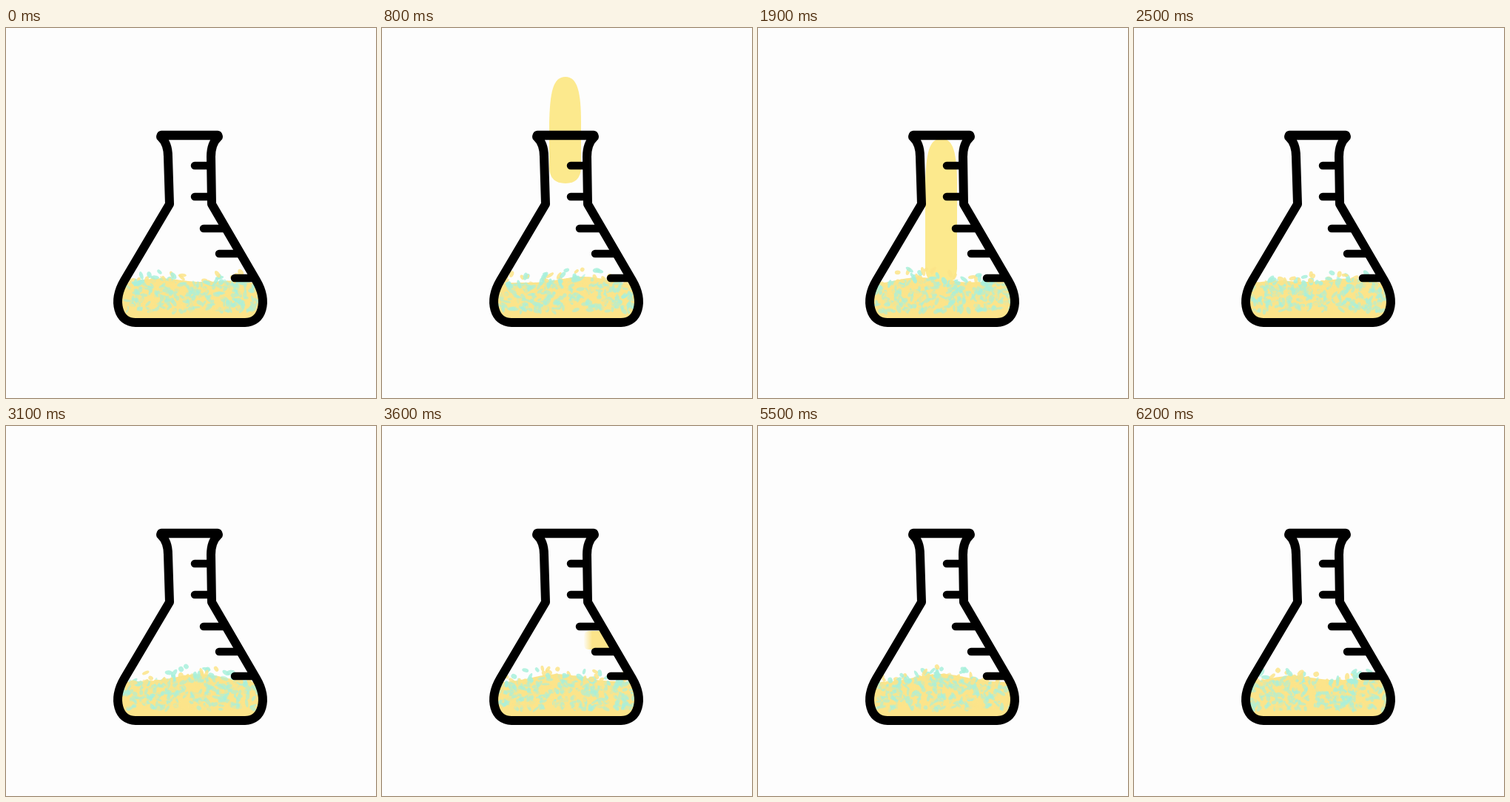
Write an HTML page with a canvas that moves like this. It is 500x500 px and loops after 6.3 s.

```html
<!DOCTYPE html>
<html lang="en">
<head>
<meta charset="utf-8">
<title>Flask</title>
<style>
html, body { margin: 0; width: 100%; height: 100%; overflow: hidden; background: #fdfdfd; }
canvas { display: block; width: 500px; height: 500px; }
</style>
</head>
<body>
<canvas id="stage" width="500" height="500"></canvas>
<script>
const ctx = document.getElementById('stage').getContext('2d');
const LOOP = 6300, STEP = 100;
const YELLOW = '#fce48a', STREAM = '#fce98d', BLUE = '#a8f0dc';
const LEFT = 150, RIGHT = 348, FLOOR = 405;

const flask = new Path2D('M209 147Q219 156 219 174L221 238L160 341C143 370 152 398 175 398H323C346 398 355 370 338 341L278 238L277 174Q277 156 287 147');
const lip = new Path2D('M210 145H286');
const ticks = new Path2D('M255 186H277M255 228H277M267 271H296M288 305H316M309 338H336');

function random(seed) {
  let s = (seed + 1) * 7919;
  return () => {
    s = (s * 1664525 + 1013904223) >>> 0;
    return s / 4294967296;
  };
}

// A slow swell that is flat at both walls.
function surface(x, t) {
  const swell = Math.sin(Math.PI * (x - LEFT) / (RIGHT - LEFT));
  const phase = Math.PI * 2 * t / LOOP;
  return 345 - swell * (8 + 4 * Math.sin(x / 24 + phase * 3));
}

function dab(x, y, rx, ry, angle, color) {
  ctx.fillStyle = color;
  ctx.beginPath();
  ctx.ellipse(x, y, rx, ry, angle, 0, Math.PI * 2);
  ctx.fill();
}

const fall = (t, start, speed) => 66 + speed * Math.max(0, (t - start) / 100) ** 2;

function drawStream(t) {
  const top = fall(t, 1270, 2.1);
  const end = Math.min(346, fall(t, 500, 16));
  const h = end - top;
  if (h < 4) return;
  const bend = Math.min(62, h / 2);
  ctx.fillStyle = STREAM;
  ctx.beginPath();
  ctx.moveTo(226, top + bend);
  ctx.bezierCurveTo(227, top + bend / 3, 231, top, 248, top);
  ctx.bezierCurveTo(264, top, 269, top + bend / 3, 269, top + bend);
  ctx.lineTo(269, end - bend / 3);
  ctx.quadraticCurveTo(268, end, 248, end);
  ctx.quadraticCurveTo(227, end, 226, end - bend / 3);
  ctx.fill();
}

function drawSplash(t) {
  const k = (t - 3600) / 100;
  if (Math.abs(k) > 3) return;
  const fade = ctx.createLinearGradient(272, 0, 284, 0);
  fade.addColorStop(0, '#fce48a00');
  fade.addColorStop(1, YELLOW);
  ctx.fillStyle = fade;
  ctx.beginPath();
  ctx.roundRect(273, 277 + 8 * k * k, 38, 25, 6);
  ctx.fill();
}

function drawLiquid(t) {
  const rnd = random(t / STEP);
  const spread = (min, max) => min + rnd() * (max - min);

  ctx.fillStyle = YELLOW;
  ctx.beginPath();
  ctx.moveTo(LEFT, FLOOR);
  for (let x = LEFT; x <= RIGHT; x += 3) ctx.lineTo(x, surface(x, t) + 2);
  ctx.lineTo(RIGHT, FLOOR);
  ctx.fill();

  ctx.globalAlpha = 0.6;
  for (let i = 0; i < 320; i++) {
    const x = spread(158, 342), y = spread(surface(x, t) + 3, 383);
    dab(x, y, spread(3, 6), spread(1.5, 3), spread(0, Math.PI), i % 5 < 3 ? BLUE : YELLOW);
  }
  // Loose dabs along the surface.
  ctx.globalAlpha = 0.85;
  for (let i = 0; i < 40; i++) {
    const x = spread(166, 332), y = surface(x, t) + 5 - 15 * rnd() ** 2;
    dab(x, y, spread(3, 6.5), spread(2, 3.5), spread(0, Math.PI), i % 2 ? YELLOW : BLUE);
  }
  ctx.globalAlpha = 1;
}

function stroke(path, width) {
  ctx.lineWidth = width;
  ctx.stroke(path);
}

function draw(now) {
  const t = Math.floor((now % LOOP) / STEP) * STEP;
  ctx.fillStyle = '#fdfdfd';
  ctx.fillRect(0, 0, 500, 500);
  drawStream(t);
  ctx.save();
  ctx.clip(flask);
  drawSplash(t);
  drawLiquid(t);
  ctx.restore();
  ctx.strokeStyle = '#000';
  ctx.lineCap = ctx.lineJoin = 'round';
  stroke(flask, 12);
  stroke(lip, 12.5);
  stroke(ticks, 10.5);
}

let start;
function tick(now) {
  start ??= now;
  draw(now - start);
  requestAnimationFrame(tick);
}
draw(0);
requestAnimationFrame(tick);
</script>
</body>
</html>
```
